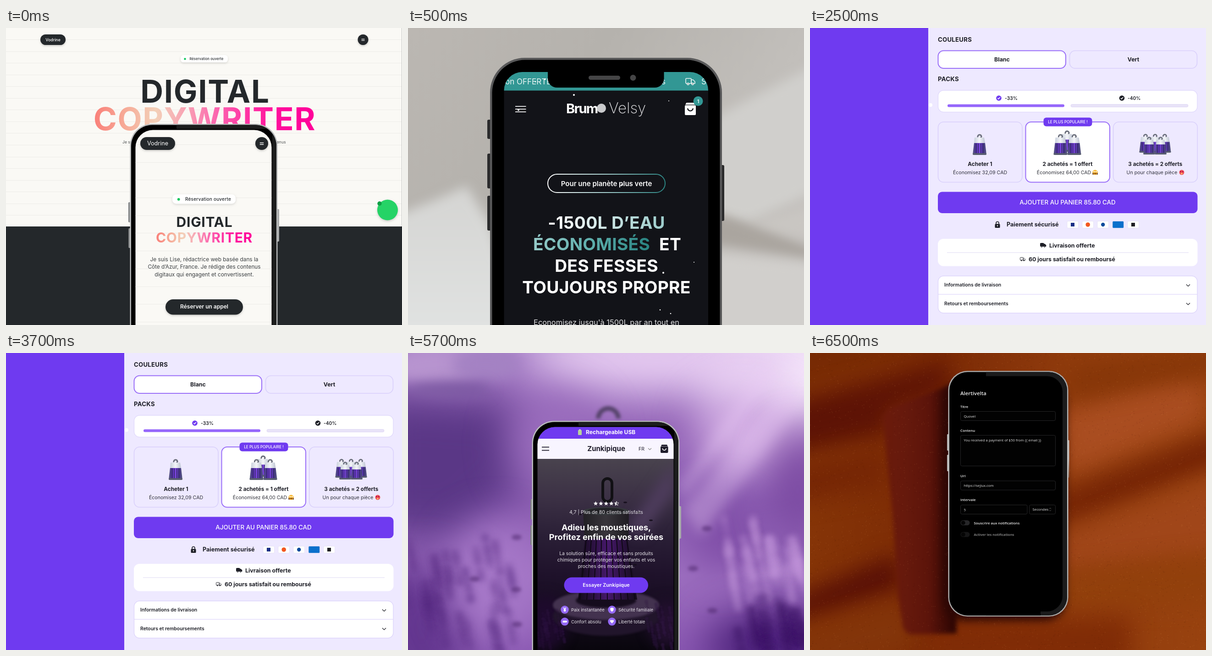
An HTML page with a canvas that plays this animation: 864x648 px, repeating every 8 s.

```html
<!DOCTYPE html>
<html lang="fr">
<head>
<meta charset="utf-8">
<title>Portfolio</title>
<style>
html, body { margin: 0; width: 100%; height: 100%; overflow: hidden; background: #000; }
canvas { display: block; width: 864px; height: 648px; }
</style>
</head>
<body>
<canvas id="stage" width="864" height="648"></canvas>
<script>
const ctx = document.getElementById('stage').getContext('2d');
const SANS = 'Inter, sans-serif', UI = '"Open Sans", sans-serif';
const INK = '#24282b', PAPER = '#faf9f5', VIOLET = '#6f3af0', TEAL = '#329794';

// ---- helpers ----
function text(str, x, y, size, { w = 400, c = '#fff', a = 'left', f = SANS, sp = 0 } = {}) {
  ctx.font = `${w} ${size}px ${f}`;
  ctx.letterSpacing = `${sp * size}px`;
  ctx.textAlign = a;
  ctx.fillStyle = c;
  ctx.fillText(str, x, y);
}
const mid = (str, x, y, size, o) => text(str, x, y, size, { ...o, a: 'center' });

function box(x, y, w, h, r, fill, stroke, lw = 1) {
  ctx.beginPath();
  ctx.roundRect(x, y, w, h, r);
  if (fill) { ctx.fillStyle = fill; ctx.fill(); }
  if (stroke) { ctx.strokeStyle = stroke; ctx.lineWidth = lw; ctx.stroke(); }
}
function disc(x, y, r, fill, ry = r) {
  ctx.beginPath();
  ctx.ellipse(x, y, r, ry, 0, 0, Math.PI * 2);
  ctx.fillStyle = fill;
  ctx.fill();
}
function path(pts, fill, stroke, lw = 1) {
  ctx.beginPath();
  for (let i = 0; i < pts.length; i += 2) ctx.lineTo(pts[i], pts[i + 1]);
  if (fill) { ctx.fillStyle = fill; ctx.fill(); }
  if (stroke) { ctx.strokeStyle = stroke; ctx.lineWidth = lw; ctx.stroke(); }
}
function grad(x0, y0, x1, y1, ...stops) {
  const g = ctx.createLinearGradient(x0, y0, x1, y1);
  stops.forEach((c, i) => g.addColorStop(i / (stops.length - 1), c));
  return g;
}
function soft(blur, draw) {
  ctx.save();
  ctx.filter = `blur(${blur}px)`;
  draw();
  ctx.restore();
}
function shadowed(blur, dy, color, draw) {
  ctx.save();
  ctx.shadowBlur = blur; ctx.shadowOffsetY = dy; ctx.shadowColor = color;
  draw();
  ctx.restore();
}
function clipped(x, y, w, h, r, draw) {
  ctx.save();
  ctx.beginPath();
  ctx.roundRect(x, y, w, h, r);
  ctx.clip();
  draw();
  ctx.restore();
}
function random(seed) {
  return () => (seed = seed * 16807 % 2147483647) / 2147483647;
}
const chevron = (x, y, s, c) => path([x - s, y - s / 2, x, y + s / 2, x + s, y - s / 2], null, c, 1.2);

function bag(x, y, w, h, fill, line) {
  box(x, y + h * .2, w, h * .8, 2, fill);
  path([x + 1, y + h * .16, x + w * .15, y, x + w * .85, y, x + w - 1, y + h * .16], fill);
  ctx.beginPath();
  ctx.arc(x + w / 2, y + h * .45, w * .24, 0, Math.PI);
  ctx.strokeStyle = line; ctx.lineWidth = w * .1; ctx.stroke();
}
function truck(x, y, s, c, solid) {
  ctx.save();
  ctx.translate(x, y); ctx.scale(s, s);
  box(0, 0, 12, 11, 1.5, solid && c, c, 1.6);
  path([12, 3, 16, 3, 20, 7, 20, 11, 12, 11, 12, 3], solid && c, c, 1.6);
  for (const cx of [5, 15]) {
    disc(cx, 12, 2.8, c);
    disc(cx, 12, 1.2, solid ? '#fff' : '#888');
  }
  ctx.restore();
}

// Tall phone cropped by the lower edge of the stage
function bigPhone(y, screen) {
  const metal = grad(268, 0, 272, 0, '#77797b', '#c9cbcc');
  box(267, y + 171, 6, 44, 2, metal);
  box(267, y + 228, 6, 43, 2, metal);
  box(590, y + 186, 6, 71, 2, '#a9abac');
  box(270.5, y, 322, 700, [48, 48, 0, 0], '#b9bbbc');
  box(273, y + 2.5, 317, 700, [46, 46, 0, 0], '#000');
  clipped(273, y + 2.5, 317, 700, [46, 46, 0, 0], () => {
    ctx.fillStyle = '#1c1d1d';
    ctx.fillRect(372, y, 230, 11);
    ctx.fillRect(581, y, 12, 700);
  });
  clipped(282.5, y + 13.5, 297, 700, [38, 38, 0, 0], screen);
}

// ---- copywriter page ----
const pinks = (x0, x1) => grad(x0, 0, x1, 0, '#fa7b76', '#f7a895', '#f3d0b8', '#f99fb4', '#fc5fae', '#ff2aa2', '#ff079b', '#ff0099');

function ruled(x, y, w, h, step) {
  ctx.fillStyle = '#edece8';
  for (let k = y; k < h; k += step) ctx.fillRect(x, Math.round(k), w, 1);
}
function pill(x, y, w, h) {
  shadowed(4, 2, '#0003', () => box(x, y, w, h, h / 2, INK));
}
function menuDot(x, y, r) {
  shadowed(4, 2, '#0003', () => disc(x, y, r, INK));
  ctx.fillStyle = '#fff';
  for (const s of [-.16, .1]) ctx.fillRect(x - r * .3, y + s * r, r * .6, r * .11);
}
function openBadge(x, y, w, h, dot, tx, size) {
  shadowed(5, 2, '#0002', () => box(x, y, w, h, h * .4, '#fff'));
  disc(dot, y + h / 2 + .5, h * .14, '#0fc65c');
  text('Réservation ouverte', tx, y + h / 2 + size * .36, size, { w: 500, c: INK, sp: .02 });
}
function writer() {
  ctx.fillStyle = PAPER; ctx.fillRect(0, 0, 864, 433);
  ruled(0, 25, 864, 430, 25.55);
  ctx.fillStyle = '#c9c9c8'; ctx.fillRect(863, 0, 1, 433);
  ctx.fillStyle = INK; ctx.fillRect(0, 433, 864, 215);
  pill(75, 14, 55, 23);
  mid('Vodrine', 102.5, 28.5, 8.8, { w: 500 });
  menuDot(779, 25.5, 11.5);
  openBadge(381, 59, 103, 16, 390.5, 400.5, 7.4);
  mid('DIGITAL', 434.5, 163, 69, { w: 700, c: INK, sp: .024 });
  mid('COPYWRITER', 433.5, 222.5, 69, { w: 700, c: pinks(185, 680), sp: .024 });
  text('Je suis', 254, 251.5, 8.6, { c: '#4a4d4f' });
  text('contenus', 610.5, 251.5, 8.6, { c: '#4a4d4f', a: 'right' });
  shadowed(5, 2, '#0003', () => disc(832.5, 397, 22.5, '#25d366'));
  disc(815, 383, 4.7, '#0f9f45');
  bigPhone(209, () => {
    ctx.fillStyle = PAPER; ctx.fillRect(282, 220, 300, 430);
    ruled(282, 254, 300, 648, 38.7);
    pill(293, 238, 76, 28);
    mid('Vodrine', 331, 256, 12.6);
    menuDot(558, 252, 14);
    openBadge(363, 363, 138, 20.5, 376.7, 391, 10);
    mid('DIGITAL', 433, 433.5, 30, { w: 700, c: INK, sp: .024 });
    mid('COPYWRITER', 432.5, 467.5, 30, { w: 700, c: pinks(325, 540), sp: .024 });
    ['Je suis Lise, rédactrice web basée dans la',
     'Côte d’Azur, France. Je rédige des contenus',
     'digitaux qui engagent et convertissent.'
    ].forEach((s, i) => mid(s, 432.5, 508.5 + i * 16.6, 11.8, { c: '#3b3f42' }));
    pill(348, 592, 169, 33.5);
    mid('Réserver un appel', 432.5, 612, 12, { w: 600 });
  });
}

// ---- water saving shop ----
function water() {
  ctx.fillStyle = grad(0, 0, 864, 648, '#bbb7b2', '#b5b2ad', '#c2bfbb', '#c7c4c1');
  ctx.fillRect(0, 0, 864, 648);
  soft(12, () => {
    path([-40, 415, 60, 375, 128, 345, 180, 430, 260, 700, -40, 700], grad(0, 360, 0, 648, '#d5d5d3', '#e0e2e1'));
    path([660, 200, 900, 75, 900, 350, 740, 425, 660, 400], '#d0cfcc');
    path([660, 490, 900, 515, 900, 700, 660, 700], '#d1cfcc');
    path([740, 430, 900, 385, 900, 455, 780, 450], '#c9c6c2');
  });
  soft(10, () => path([660, 400, 720, 420, 880, 480, 900, 505, 660, 470], '#aaa59f'));
  for (const [y, h] of [[200, 42], [274, 76], [366, 76]]) box(173, y, 12, h, 3, '#2b2b2c');
  box(678, 299, 12, 122, 3, '#2b2b2c');
  box(179, 65, 506, 700, [76, 76, 0, 0], '#59595a');
  box(183.5, 69.5, 497, 700, [72, 72, 0, 0], '#000');
  clipped(209.5, 96, 445.5, 700, [40, 40, 0, 0], () => {
    ctx.fillStyle = '#121318'; ctx.fillRect(200, 90, 460, 570);
    ctx.fillStyle = TEAL; ctx.fillRect(200, 90, 460, 46.5);
    text('on OFFERTE', 212, 123, 17, { c: '#eaf5f4' });
    text('s', 553, 123, 17, { c: '#eaf5f4' });
    truck(606, 110, 1, '#eaf5f4');
    text('S', 640, 123, 17, { c: '#eaf5f4' });
  });
  box(305, 80, 253.5, 50, [0, 0, 20, 20], '#000');
  box(394, 104, 69, 9, 4.5, '#454546');
  disc(491, 108.5, 6.5, '#454546');

  ctx.fillStyle = '#d8d8da';
  for (const y of [170, 176, 182]) ctx.fillRect(234, y, 23.5, 2);
  text('Brum', 345, 186, 29, { w: 700, sp: -.06 });
  disc(422, 175, 10, '#c9cacc');
  text('Velsy', 438, 186, 33, { w: 200, c: '#e4e4e6' });
  bag(604, 163, 24, 27, '#fff', '#121318');
  disc(633, 159.5, 10.5, TEAL);
  mid('1', 633, 163.5, 11, { w: 600 });

  box(305, 319, 256, 40, 20, null, grad(305, 0, 561, 0, '#fff', '#a4cfce', '#2b8583'), 2);
  mid('Pour une planète plus verte', 433, 344.5, 15, { w: 600 });
  const head = { w: 700, sp: .008 };
  mid('-1500L D’EAU', 433, 438, 37.2, { ...head, c: grad(320, 0, 640, 0, '#fff', '#b9dbda', '#82bfbd') });
  text('ÉCONOMISÉS', 273, 484.5, 37.2, { ...head, c: grad(273, 0, 536, 0, '#96cbc9', '#5cadab', '#25807e') });
  text('ET', 596, 484.5, 37.2, { ...head, a: 'right' });
  mid('DES FESSES', 433, 531.5, 37.2, head);
  mid('TOUJOURS PROPRE', 433, 579, 37.2, head);
  mid("Economisez jusqu'à 1500L par an tout en", 433, 648, 16.4, { c: '#dededf' });
  [[362, 146, 2], [569, 159, 1], [624, 511, 1], [557, 534, 2], [550, 615, 1.3], [573, 623, 1.3],
   [241, 179, 2], [467, 342, 2], [278, 117, 1.5], [299, 112, 1.5]]
    .forEach(([x, y, r]) => disc(x, y, r, '#fff'));
}

// ---- product options ----
function lamp(x, y, s = 1) {
  ctx.save();
  ctx.translate(x, y); ctx.scale(s, s);
  ctx.beginPath();
  ctx.arc(0, -40, 4, Math.PI * .9, Math.PI * 2);
  ctx.lineTo(2, -36);
  ctx.strokeStyle = '#6b6f7c'; ctx.lineWidth = 3; ctx.stroke();
  path([-11, -38, 10, -38, 12, -26, -12, -26], grad(-12, 0, 12, 0, '#c9d0dc', '#f3f5f8', '#bdc4d2'));
  path([-12, -26, 12, -26, 15, -1, -15, -1], grad(-15, 0, 15, 0, '#54597a', '#4b2b9c', '#7a45dd', '#43308a', '#555a78'));
  ctx.fillStyle = '#2b2450';
  for (let i = -8; i < 10; i += 5) ctx.fillRect(i, -25, 1, 22);
  box(-15, -4, 30, 4, 2, '#585d70');
  ctx.restore();
}
function check(x, y, c) {
  disc(x, y, 5.8, c);
  path([x - 2.7, y, x - .7, y + 2, x + 2.8, y - 2], null, '#fff', 1.5);
}
function face(x, y, hot) {
  disc(x, y, 5.5, hot ? '#f0525f' : '#f7b52c');
  const c = hot ? '#b3123a' : '#3f7fc4';
  disc(x - 2.2, y - 1.5, 1.4, hot ? c : '#fff');
  disc(x + 2.2, y - 1.5, 1.4, hot ? c : '#fff');
  disc(x, y + 2.6, 1.6, hot ? '#fbd25a' : '#5d2c12');
  if (!hot) ctx.fillRect(x - 5.5, y + 1, 2, 4), ctx.fillRect(x + 3.5, y + 1, 2, 4);
}
function options() {
  const ink = '#1d1e26', edge = '#d9d0fb', white = '#fff', bold = { w: 700, c: ink }, semi = { w: 600, c: ink };
  ctx.fillStyle = '#eee9ff'; ctx.fillRect(0, 0, 864, 648);
  ctx.fillStyle = VIOLET; ctx.fillRect(0, 0, 258, 648);
  disc(263, 168, 4, white);
  text('COULEURS', 279, 29.5, 13.2, { ...bold, sp: .02 });
  box(279.5, 49.5, 278.5, 38.5, 12, white, '#9a6ff8', 2);
  box(566.5, 49.5, 278, 38.5, 12, null, edge, 1.6);
  mid('Blanc', 419, 73, 12.4, bold);
  mid('Vert', 705.5, 73, 12.4, bold);
  text('PACKS', 279, 116, 13.2, { ...bold, sp: .02 });

  box(279.5, 136, 565.5, 47.5, 12, white, '#e1dafc', 1.4);
  check(412, 153, VIOLET);
  text('-33%', 425, 156.5, 10.2, semi);
  check(680.5, 153, ink);
  text('-40%', 693, 156.5, 10.2, semi);
  box(300, 166.5, 255, 6, 3, '#9566fb');
  box(569, 166.5, 256, 6, 3, '#e8e3f8', '#dcd5f3', .8);

  [['Acheter 1', 'Économisez 32,09 CAD', 371], ['2 achetés = 1 offert', 'Économisez 64,00 CAD', 562, 554],
   ['3 achetés = 2 offerts', 'Un pour chaque pièce', 753.3, 746]].forEach(([a, b, x, bx = x], i) => {
    const on = i === 1;
    box(x - 91.5, 205, 183.5, 131.5, 12, on && white, on ? '#9a6ff8' : edge, on ? 2 : 1.6);
    mid(a, x, 301, 11.7, bold);
    mid(b, bx, 318.5, 10.6, { c: '#30313a' });
  });
  face(622, 315);
  face(811, 315, true);
  box(509.5, 195.5, 106, 19, 6, VIOLET);
  mid('LE PLUS POPULAIRE !', 562.5, 208, 8.3, { w: 500 });
  lamp(370, 277);
  lamp(561, 270, 1.02); lamp(546.5, 277); lamp(576.5, 277);
  for (const x of [732, 753, 774]) lamp(x, 272, .9);
  lamp(740, 276, .85); lamp(765, 276, .85);

  box(279, 357.5, 566.5, 46.5, 9, VIOLET);
  mid('AJOUTER AU PANIER 85.80 CAD', 562, 385, 13.4, { w: 500 });

  box(403.5, 427.5, 11, 8.5, 1.5, ink);
  box(406, 422.5, 6, 8, 3, null, ink, 1.6);
  disc(409, 431.5, 1.2, white);
  text('Paiement sécurisé', 429, 433, 12.6, bold);
  [561, 594, 627, 660, 693].forEach((x, i) => box(x, 421.5, 24.5, 15, 2, i === 3 ? '#0b70cc' : white, '#e3def2', .7));
  box(569, 425, 8, 8, 0, '#1a2f86');
  disc(606.2, 429, 4.8, '#f2571f');
  disc(639.2, 429, 4.2, '#0b4a9c');
  box(701, 425, 8, 8, 0, '#202024');

  box(279, 460, 566.5, 59.5, 12, white);
  truck(502.5, 469.5, .62, ink, true);
  text('Livraison offerte', 522, 479, 12.4, bold);
  ctx.fillStyle = '#ded8f4'; ctx.fillRect(299, 489.5, 527, 1);
  truck(458.5, 500.5, .55, ink);
  text('60 jours satisfait ou remboursé', 477, 509, 12.4, bold);

  box(279.5, 541, 565.5, 81, 12, white, '#ded6fb', 1.4);
  ctx.fillStyle = '#ded6fb'; ctx.fillRect(279, 580.5, 566, 1.2);
  text('Informations de livraison', 293, 564, 10.4, semi);
  text('Retours et remboursements', 293, 605, 10.4, semi);
  chevron(825, 561.5, 4, ink);
  chevron(825, 602, 4, ink);
}

// ---- lavender lamp page ----
function star(x, y, r, half) {
  const pts = [];
  for (let i = 0; i < 10; i++) {
    const a = i * Math.PI / 5 - Math.PI / 2, d = i % 2 ? r * .45 : r;
    pts.push(x + d * Math.cos(a), y + d * Math.sin(a));
  }
  pts.push(pts[0], pts[1]);
  if (!half) return path(pts, '#fff');
  path(pts, null, '#fff', .8);
  ctx.save();
  ctx.beginPath(); ctx.rect(x - r, y - r, r, 2 * r); ctx.clip();
  path(pts, '#fff');
  ctx.restore();
}
function stems(n, x, y, w, h, color, seed, size) {
  const rnd = random(seed);
  for (let i = 0; i < n; i++) {
    const px = x + rnd() * w, py = y + rnd() * h;
    ctx.globalAlpha = .25 + rnd() * .4;
    for (let k = 0; k < 6; k++) disc(px + k * size * .25, py + k * size * 1.4, size * (.5 + rnd() * .5), color);
  }
  ctx.globalAlpha = 1;
}
function lavender() {
  ctx.fillStyle = grad(0, 0, 0, 648, '#a881c8', '#9465b8', '#8c5db3', '#9d6fc0', '#8a58b2');
  ctx.fillRect(0, 0, 864, 648);
  soft(45, () => {
    path([-80, 90, 230, 110, 280, 260, 120, 400, -80, 390], '#5a3786');
    disc(830, 40, 190, '#f6e8fb', 120);
    disc(560, 10, 300, '#e6cbf1', 75);
    disc(740, 170, 110, '#d3aee4', 90);
    disc(320, 200, 100, '#9a6dbd', 110);
    disc(30, 600, 110, '#63368f', 150);
    disc(800, 640, 150, '#4a2078', 80);
    disc(190, 500, 100, '#a678c8', 130);
    disc(690, 400, 70, '#7d4ba5', 80);
    disc(850, 300, 50, '#79489f', 130);
  });
  soft(14, () => {
    disc(60, 30, 95, '#b794cf', 42);
    disc(170, 25, 75, '#a482c3', 35);
    disc(90, 80, 90, '#7d5aa3', 18);
    ctx.globalAlpha = .35;
    path([830, 60, 864, 100, 640, 400, 600, 340], '#e9c9f4');
    path([780, 20, 800, 50, 600, 320, 590, 290], '#e9c9f4');
    ctx.globalAlpha = 1;
  });
  soft(7, () => {
    stems(26, -10, 400, 240, 200, '#54287f', 11, 9);
    stems(26, 690, 360, 170, 130, '#c497dc', 23, 10);
    stems(22, 720, 520, 150, 100, '#3f1768', 37, 10);
  });
  soft(3, () => {
    [[237, 402], [145, 493], [236, 516], [652, 383], [622, 470], [664, 562], [238, 592]]
      .forEach(([x, y]) => disc(x, y, 11, '#4f286f88', 6));
    ctx.beginPath();
    ctx.arc(437, 143, 22, Math.PI, 0);
    ctx.strokeStyle = '#55436a'; ctx.lineWidth = 10; ctx.stroke();
  });
  bigPhone(148, lampScreen);
}
function lampScreen() {
  const ink = '#1f1c2b';
  ctx.fillStyle = grad(0, 231, 0, 648, '#49434e', '#3c3145', '#2a1f36', '#1f122b', '#150c1e', '#09060d');
  ctx.fillRect(282, 160, 300, 490);
  soft(14, () => {
    path([580, 240, 580, 300, 510, 400, 480, 380], '#4f3d5e');
    disc(300, 590, 45, '#1e0a2d', 60);
    disc(565, 590, 40, '#23102f', 50);
  });
  soft(2, () => {
    disc(432, 575, 116, '#21152b', 42);
    disc(432, 550, 116, '#43324f', 32);
    disc(432, 540, 66, '#150c1d', 16);
  });
  path([386, 405, 479, 405, 500, 538, 371, 538], grad(371, 0, 500, 0, '#120c18', '#2b1140', '#47196d', '#2b1140', '#120c18'));
  for (let i = -4; i <= 4; i++) path([433 + i * 11, 405, 435 + i * 15, 538], null, '#0d0812', 2);
  path([382, 345, 482, 345, 481, 405, 385, 405], grad(382, 0, 482, 0, '#222025', '#38353b', '#1f1c22'));
  disc(432, 345, 50, '#35383c', 9);
  disc(432, 344, 40, '#222226', 6);
  box(425, 274, 20, 50, 10, null, '#111014', 6);
  soft(1, () => stems(18, 283, 540, 60, 100, '#2b123e', 51, 4));
  soft(1, () => stems(18, 520, 540, 55, 100, '#2e1640', 61, 4));
  [[474, 326], [375, 352], [503, 348], [530, 365], [360, 432], [345, 515], [495, 462]]
    .forEach(([x, y]) => disc(x, y, 4, '#17101d', 1.7));

  ctx.fillStyle = VIOLET; ctx.fillRect(282, 160, 300, 27);
  box(371, 168, 8, 11, 1.5, '#b7d49a');
  box(373, 166.5, 4, 2, 0, '#d7d7d7');
  text('Rechargeable USB', 388, 177, 12, { w: 700 });
  ctx.fillStyle = '#f8f5ff'; ctx.fillRect(282, 187, 300, 44);
  ctx.fillStyle = ink;
  ctx.fillRect(292, 204.5, 16, 1.8); ctx.fillRect(292, 211.5, 16, 1.8);
  mid('Zunkipique', 432.5, 214, 15, { w: 700, c: ink });
  text('FR', 503, 212.5, 10.4, { c: ink });
  chevron(527.5, 209.5, 3.5, '#888');
  bag(551, 200, 16.5, 18, ink, '#fff');

  for (let i = 0; i < 5; i++) star(409.5 + i * 11.4, 328.5, 5, i === 4);
  mid('4,7 | Plus de 80 clients satisfaits', 432.5, 351, 10.6, { c: '#e6e3e9' });
  mid('Adieu les moustiques,', 432.5, 387, 18, { w: 700 });
  mid('Profitez enfin de vos soirées', 432.5, 408, 18, { w: 700 });
  ['La solution sûre, efficace et sans produits', 'chimiques pour protéger vos enfants et vos', 'proches des moustiques.']
    .forEach((s, i) => mid(s, 432.5, 440.5 + i * 14, 10.4, { c: '#e6e3e9' }));
  box(340.5, 489.5, 183.5, 34, 17, VIOLET);
  mid('Essayer Zunkipique', 432.5, 510, 10.8, { w: 600 });
  [['Paix instantanée', 342, 560], ['Sécurité familiale', 445, 560], ['Confort absolu', 342, 586], ['Liberté totale', 445, 586]]
    .forEach(([s, x, y], i) => {
      disc(x, y, 8.7, '#9469f5');
      if (i === 0) {
        box(x - 2.2, y - 1, 4.4, 5, 1.5, '#fff');
        path([x - 2.5, y - 4.5, x, y, x + 2.5, y - 4.5], null, '#fff', 1.6);
      } else if (i === 1) path([x, y - 4.5, x + 4, y - 3, x + 3, y + 2, x, y + 4.5, x - 3, y + 2, x - 4, y - 3], '#fff');
      else if (i === 2) box(x - 4.5, y - 2, 7, 4, 1.5, '#fff'), disc(x + 3, y, 2, '#fff');
      else {
        disc(x - 1.9, y - 1.4, 2.2, '#fff'); disc(x + 1.9, y - 1.4, 2.2, '#fff');
        path([x - 4, y - .6, x + 4, y - .6, x, y + 4], '#fff');
      }
      text(s, x + 14, y + 3.5, 9.4, { c: '#e9e6ec' });
    });
}

// ---- notification form ----
function notify() {
  ctx.fillStyle = grad(0, 0, 864, 0, '#853407', '#7b2a05', '#913c0d', '#98420f');
  ctx.fillRect(0, 0, 864, 648);
  soft(24, () => {
    path([-60, 90, 330, -50, -60, -50], '#772a04');
    path([-60, 110, 300, 20, 300, 80, 170, 130, 170, 175, -60, 225], '#5d1305');
    path([-60, 255, 160, 210, 170, 290, -60, 330], '#762605');
    path([-60, 545, 190, 440, 200, 510, -60, 590], '#560e06');
    path([-60, 640, 200, 540, 240, 640, -60, 720], '#83350a');
    path([540, 130, 780, 55, 860, 60, 860, 150, 560, 270], '#a94d20');
    path([540, 310, 920, 160, 920, 235, 540, 375], '#742305');
    path([540, 400, 920, 265, 920, 430, 540, 480], '#a04619');
    path([540, 480, 920, 440, 920, 540, 540, 560], '#92400c');
    path([560, 30, 920, -20, 920, 40, 560, 100], '#863608');
    path([260, 590, 700, 575, 700, 700, 260, 700], '#802c06');
  });
  soft(5, () => {
    path([158, 140, 172, 120, 300, 72, 320, 72, 320, 612, 215, 614, 203, 600, 192, 530, 180, 350],
      grad(158, 0, 310, 0, '#6a1b0b', '#66190c', '#5c140a', '#310704'));
  });
  soft(9, () => box(290, 60, 268, 524, 45, '#2d0704'));

  const rnd = random(77);
  for (let i = 0; i < 5000; i++) {
    ctx.fillStyle = i % 2 ? '#ffb07012' : '#30080014';
    ctx.fillRect(rnd() * 864, rnd() * 648, 2, 2);
  }
  box(299, 177, 5, 36, 1.5, '#b5b4b3');
  box(299, 222, 5, 36, 1.5, '#b5b4b3');
  box(560, 190, 5.5, 82, 1.5, grad(0, 190, 0, 272, '#c5c4c3', '#bbb', '#7d5a48'));
  box(301.5, 39, 262, 536, 42, grad(0, 39, 0, 575, '#a7a6a5', '#c9c9c9', '#a7a6a5'));
  box(304, 41.5, 257, 531, 40, '#000');
  clipped(304, 41.5, 257, 531, 40, () => {
    ctx.fillStyle = '#1b1b1c';
    ctx.fillRect(384, 41, 180, 532);
    ctx.fillStyle = '#000';
    ctx.fillRect(304, 300, 199, 273);
    box(312, 50.5, 239, 513.5, 34, '#000');
  });

  const ui = { f: UI, c: '#e8e8e8' }, label = { f: UI, w: 600, c: '#efefef' };
  const field = (x, y, w, h) => box(x, y, w, h, 3, '#020202', '#252527', 1);
  text('Alertivelta', 328, 92, 11.4, label);
  [['Titre', 119.5], ['Contenu', 171.5], ['Url', 271], ['Intervale', 323]].forEach(([s, y]) => text(s, 328, y, 7.8, label));
  field(328.5, 127.5, 207, 20);
  text('Quovel', 335.5, 141, 7.8, ui);
  field(328.5, 179.5, 207, 67);
  text('You received a payment of $50 from {{ email }}', 335.5, 193, 7.8, ui);
  field(328.5, 279, 207, 20);
  text('https://sejiux.com', 335.5, 292, 7.8, ui);
  field(328.5, 331.5, 145.5, 20);
  text('5', 335.5, 344.5, 7.8, ui);
  field(478.5, 331.5, 57, 20);
  text('Secondes', 485.5, 344, 7.8, ui);
  path([522, 340, 524, 338, 526, 340], null, '#777', .8);
  path([522, 342.5, 524, 344.5, 526, 342.5], null, '#777', .8);
  [['Souscrire aux notifications', 370.5, '#272729', '#efefef'], ['Activer les notifications', 396, '#161617', '#9a9a9a']]
    .forEach(([s, y, bg, c]) => {
      box(328.5, y - 5.5, 20, 11, 5.5, bg);
      disc(334.2, y, 4.5, '#050505');
      text(s, 357.5, y + 3, 7.8, { ...label, c });
    });
}

// ---- timeline: hard cuts, one slide at a time ----
const slides = [[0, writer], [500, water], [2500, options], [4500, lavender], [6500, notify]];
let shown;
function tick() {
  const t = performance.now() % 8000;
  const draw = slides.findLast(s => t >= s[0])[1];
  if (draw !== shown) {
    shown = draw;
    ctx.clearRect(0, 0, 864, 648);
    draw();
  }
  requestAnimationFrame(tick);
}
tick();
</script>
</body>
</html>
```
